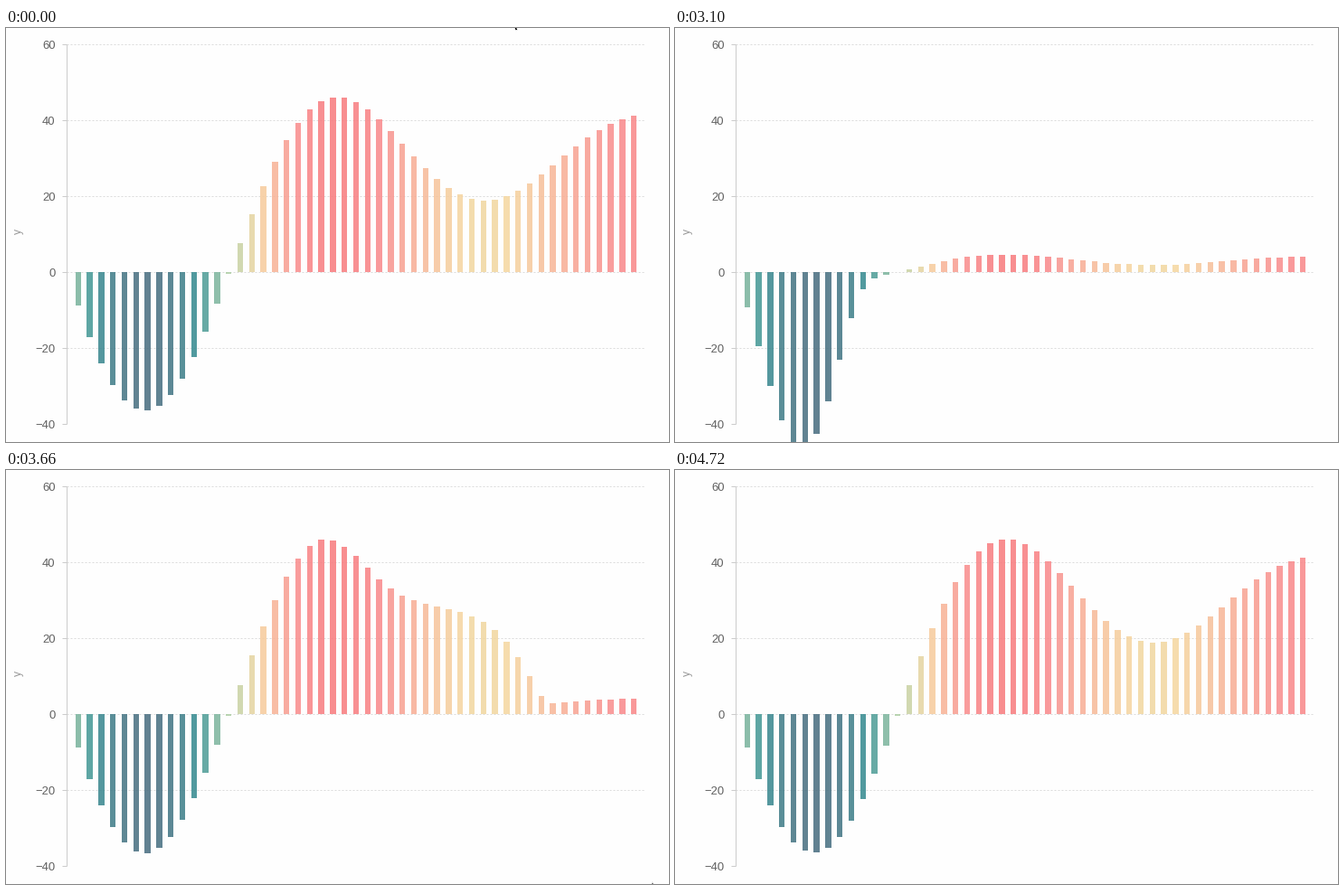
A matplotlib script that plays this animation: 733 px wide and 458 px high, repeating every 5.01 s.

```python
import numpy as np
import matplotlib.pyplot as plt
from matplotlib.animation import FuncAnimation
from matplotlib.collections import PolyCollection
from matplotlib.colors import LinearSegmentedColormap
from matplotlib.patches import Polygon

W, H, DPI = 733, 458, 100
PX = 72 / DPI               # one pixel in points
LOOP, TICK = 5010, 10       # ms
LEFT, RIGHT, ZERO, UNIT = 67, 706, 270, 4.2
BAND, BAR = 12.8, 6.4

RESET = 2840                # all bars fall back to a tenth
REST = 0.1
GROW, STAGGER = 1000, 20    # ms per bar, ms between bars

# moments at which the picture is refreshed
STEPS = np.array([
    2840, 2900, 2970, 3040, 3100, 3150, 3210, 3260, 3320,
    3380, 3430, 3490, 3550, 3610, 3660, 3750, 3840,
    3930, 3990, 4050, 4120, 4180, 4250, 4310, 4380, 4440,
    4500, 4550, 4610, 4660, 4720])

index = np.arange(1, 50)
values = 5 * (np.sin(index / 5) * (index / 5 - 10) + index / 6)
ramp = LinearSegmentedColormap.from_list("ramp", [
    "#4a657a", "#308e92", "#b1cfa5", "#f5d69f", "#f9898b", "#f7555a"])


def elastic_out(k):
    k = np.clip(k, 0, 1)
    wave = 2 ** (-10 * k) * np.sin((k - 0.075) * 2 * np.pi / 0.3) + 1
    return np.where(k <= 0, 0, np.where(k >= 1, 1, wave))


def scale_at(t):
    if t < RESET:
        return np.ones(len(index))
    now = STEPS[STEPS <= t][-1]
    start = np.interp(now, [3100, 3430], [2868, 2829])
    k = (now - start - STAGGER * index) / GROW
    return REST + (1 - REST) * elastic_out(k)


def bar_shapes(scale):
    left = LEFT + BAND * index - BAR / 2
    right = left + BAR
    base = np.full(len(index), ZERO)
    end = ZERO - UNIT * values * scale
    x = np.stack([left, right, right, left], axis=1)
    y = np.stack([base, base, end, end], axis=1)
    return np.stack([x, y], axis=2)


def pointer_at(t):
    """Tip position and opacity of the mouse pointer."""
    if t < 2570:
        return 558, -13, 1
    if t < 2660:
        return 561.5, -14.5, 0.3
    if 3660 <= t < 3750:
        return 714, 455.5, 1
    return 0, -50, 0


fig = plt.figure(figsize=(W / DPI, H / DPI), dpi=DPI, facecolor="#fefefe")
ax = fig.add_axes([0, 0, 1, 1])
ax.set(xlim=(0, W), ylim=(H, 0))
ax.axis("off")


def line(x, y, color, style="-"):
    ax.plot(x, y, color=color, lw=PX, ls=style, zorder=1,
            solid_capstyle="butt", dash_capstyle="butt")


for value in range(-40, 61, 20):
    y = ZERO - UNIT * value
    if value > -40:
        line([LEFT, RIGHT], [y, y], "#dcdcdc", (0, (2, 2)))
    line([LEFT - 5, LEFT], [y, y], "#cccccc")
    ax.text(54.5, y + 4.6, str(value).replace("-", "\u2212"), ha="right",
            va="baseline", size=13 * PX, color="#606060",
            family="Liberation Sans")
line([LEFT, LEFT], [18, 438], "#cccccc")
ax.text(13.5, 225, "y", rotation=90, ha="center", va="center",
        size=12 * PX, color="#999999", family="Liberation Sans")

bars = PolyCollection(bar_shapes(np.ones(len(index))),
                      facecolors=ramp((values + 40) / 100),
                      edgecolors="none", alpha=0.85, zorder=2)
ax.add_collection(bars, autolim=False)

ARROW = np.array([(0, 0), (0, 14), (3.2, 11), (5.5, 16),
                  (7.7, 15), (5.5, 10.3), (9.8, 10.3)])
pointer = Polygon(ARROW, closed=True, facecolor="black",
                  edgecolor="white", lw=0.8 * PX, zorder=3)
ax.add_patch(pointer)


def draw(n):
    t = n * TICK
    bars.set_verts(bar_shapes(scale_at(t)))
    x, y, opacity = pointer_at(t)
    pointer.set_xy(ARROW + (x, y))
    pointer.set_alpha(opacity)
    return bars, pointer


anim = FuncAnimation(fig, draw, frames=LOOP // TICK, interval=TICK,
                     repeat=True, repeat_delay=0, blit=False)
plt.show()
```
